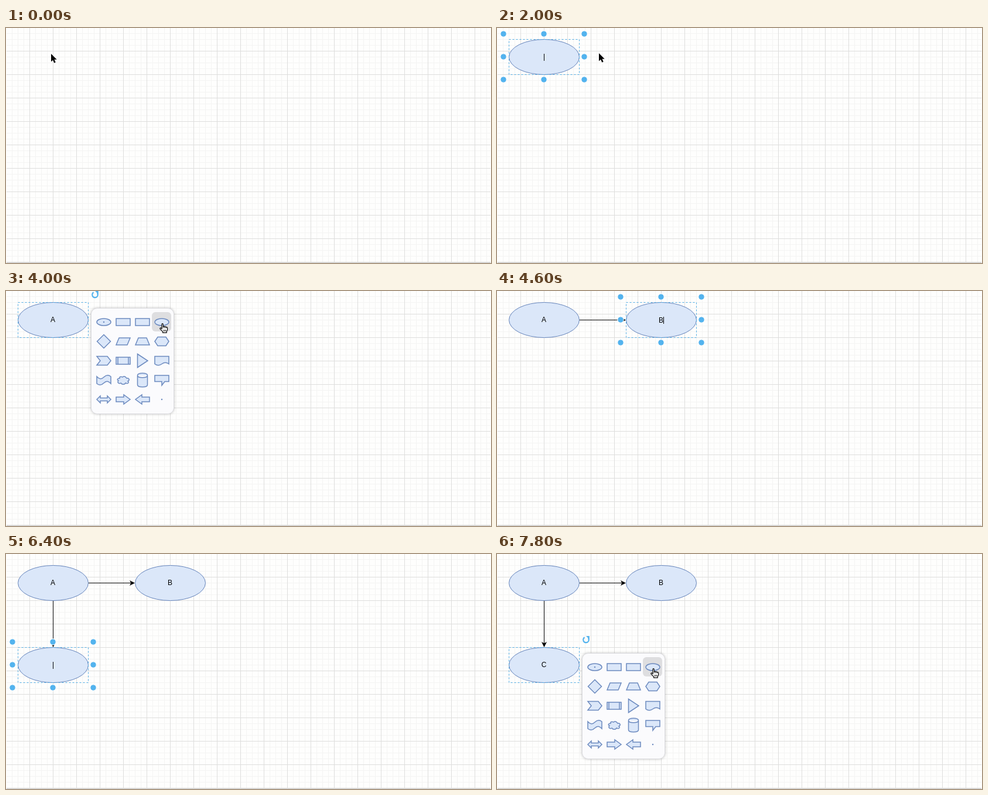
Animation of 828x401 px, one loop 8000 ms. Source, as an HTML page:

```html
<!DOCTYPE html>
<html lang="en">
<head>
<meta charset="utf-8">
<title>Diagram editor</title>
<style>
html, body { margin: 0; width: 100%; height: 100%; overflow: hidden; background: #fefefd; }
svg { display: block; }
text { font: 12px "Liberation Sans", Arial, sans-serif; text-anchor: middle; fill: #000; }
.shape { fill: #dbe7f9; stroke: #6584bb; }
.icon { fill: #dbe7f9; stroke: #6c8abf; stroke-width: 1.5; }
.panel { fill: #fbfbfd; stroke: #dcdce0; filter: drop-shadow(0 0 2px rgba(0,0,0,.25)); }
.frame { fill: none; stroke: #50ace4; stroke-dasharray: 3 3; }
.handle { fill: #53b3ee; stroke: #fff; stroke-width: 1; }
</style>
</head>
<body>
<svg width="828" height="401" viewBox="0 0 828 401">
  <g id="grid" fill="none"></g>
  <g id="scene"></g>
</svg>
<script>
const LOOP = 8000, STEP = 200;
const RX = 60, RY = 30;

// Life of each node: created, typed, committed, hovered, deselected
const nodes = [
  { label: 'A', x: 80.5, y: 49.5, born: 2000, typed: 2400, commit: 2800, hover: 3400, off: 4200 },
  { label: 'B', x: 280.5, y: 49.5, born: 4200, typed: 4400, commit: 4800, hover: LOOP, off: 6200 },
  { label: 'C', x: 80.5, y: 189.5, born: 6200, typed: 6600, commit: 7000, hover: 7200, off: LOOP }
];

const pickers = [
  { from: 1000, to: 2000, x: 56, y: 22 },
  { from: 3600, to: 4200, x: 145, y: 29 },
  { from: 5400, to: 6200, x: 60, y: 84 },
  { from: 7400, to: 8000, x: 145, y: 169 }
];

// from, to, kind, x0, y0, x1, y1
const moves = [
  [0, 1000, 'arrow', 77, 44, 77, 44],
  [1000, 1600, 'hand', 74, 44, 173, 47],
  [1600, 2000, 'hand', 173, 47, 173, 47],
  [2000, 2400, 'arrow', 174, 43, 174, 43],
  [3000, 3400, 'arrow', 174, 43, 175, 46],
  [3400, 3600, 'arrow', 175, 46, 175, 46],
  [3600, 4000, 'hand', 163, 52, 262, 55],
  [4000, 4200, 'hand', 262, 55, 262, 55],
  [4800, 5400, 'arrow', 264, 55, 90, 98],
  [5400, 6000, 'hand', 78, 105, 177, 110],
  [6000, 6200, 'hand', 177, 110, 177, 110],
  [7000, 7400, 'arrow', 181, 108, 162, 188],
  [7400, 7800, 'hand', 163, 192, 262, 195],
  [7800, 8000, 'hand', 262, 195, 262, 195]
];

const oval = 'M-12 0A12 6 0 0 1 12 0A12 6 0 0 1-12 0Z';
const box = 'M-12-6H12V6H-12Z';
const dot = 'M-.5 0A.5.5 0 0 1 .5 0A.5.5 0 0 1-.5 0Z';
const icons = [
  oval + dot, box, box, oval,
  'M0-11.5L11.5 0 0 11.5-11.5 0Z',
  'M-12 6L-7-6H12L7 6Z',
  'M-12 6L-7-6H7L12 6Z',
  'M-12 0L-7-7.5H7L12 0 7 7.5H-7Z',
  'M-12-7.5H6L12 0 6 7.5H-12L-6 0Z',
  box + 'M-9-6V6M9-6V6',
  'M-8.5-11.5L9 0-8.5 11.5Z',
  'M-12-7.5H12V5.5Q6 1 0 5.5T-12 5.5Z',
  'M-12-6Q-6 1 0-5T12-6V6Q6-1 0 5T-12 6Z',
  'M-6-3C-10-3-11 0-8 1C-11 4-7 7-4 5C-2 8 3 8 4 5C8 7 11 4 8 2C12 0 10-4 6-3C4-7 0-7-1-5C-4-7-7-5-6-3Z',
  'M-8.5-8C-8.5-13 8.5-13 8.5-8V8C8.5 13-8.5 13-8.5 8ZM-8.5-8C-8.5-3 8.5-3 8.5-8',
  'M-12-8H12V2.5H5L0 9V2.5H-12Z',
  'M-12 0L-6-6V-2.5H6V-6L12 0 6 6V2.5H-6V6Z',
  'M-12-4H1V-8L12 0 1 8V4H-12Z',
  'M12-4H-1V-8L-12 0-1 8V4H12Z',
  dot
];

const cursors = {
  arrow: '<path d="M0 0V13.6L3.1 10.7 5.3 15.7 7.7 14.6 5.5 9.8H9.7Z" stroke="#fff" stroke-width="1.2" paint-order="stroke"/>',
  hand: '<path d="M4 10V2.2Q4 .7 5.1 .7T6.3 2.2V6Q7.6 4.9 8.8 6.2 10.2 5.3 11.3 6.7 13.4 6.1 13.6 8V11.5L12.2 14V16.2H5.6V14.4L1.8 10.6Q.3 8.6 1.4 8 2.5 7.5 4 9.6Z" fill="#fff" stroke="#000" stroke-width="1.2" stroke-linejoin="round"/>' +
    '<path d="M6.3 6V8.5M8.8 6.4V8.6M11.3 7V8.8M7.2 11V14M9 11V14M10.8 11V14" fill="none" stroke="#000" stroke-width=".8"/>'
};

const path = (d, attrs) => `<path d="${d}" ${attrs}/>`;
const at = (x, y, body) => `<g transform="translate(${x} ${y})">${body}</g>`;
const during = (t, from, to) => t >= from && t < to;

function drawGrid() {
  let minor = '', major = '';
  for (let x = 10; x < 828; x += 10) {
    const d = `M${x + .5} 0V400`;
    x % 40 ? minor += d : major += d;
  }
  for (let y = 10; y <= 400; y += 10) {
    const d = `M1 ${y - .5}H827`;
    y % 40 ? minor += d : major += d;
  }
  document.getElementById('grid').innerHTML = path(minor, 'stroke="#f4f4f3"') +
    path(major, 'stroke="#dededd"') + path('M1 400.5H827', 'stroke="#d4d4d4"');
}

function edge(n) {
  const a = nodes[0], down = n.y > a.y;
  const len = down ? n.y - a.y - 2 * RY : n.x - a.x - 2 * RX;
  const x = down ? a.x : a.x + RX, y = down ? a.y + RY : a.y;
  return `<g transform="translate(${x} ${y}) rotate(${down ? 90 : 0})">` +
    path(`M0 0H${len - 6}`, 'stroke="#000"') +
    path(`M${len - .5} 0l-9-4.5 2.3 4.5-2.3 4.5Z`, '') + '</g>';
}

function shape(n, t) {
  const editing = t < n.commit;
  let s = `<ellipse class="shape" cx="${n.x}" cy="${n.y}" rx="${RX}" ry="${RY}"/>`;
  if (t >= n.typed) s += `<text x="${n.x - .5}" y="${n.y + (editing ? 4 : 3.5)}">${n.label}</text>`;
  if (editing && (t - n.born) % 1000 < 600)
    s += path(`M${n.x + (t >= n.typed ? 4 : 0)} ${n.y - 5.5}v12`, 'stroke="#000"');
  return s;
}

function selection(n, t) {
  const editing = t < n.commit, pad = editing ? 9 : 0;
  let s = `<rect class="frame" x="${n.x - RX}" y="${n.y - RY}" width="${2 * RX}" height="${2 * RY}"/>`;
  if (t < n.hover)
    for (const i of [-1, 0, 1]) for (const j of [-1, 0, 1])
      if (i || j) s += `<circle class="handle" cx="${n.x - .5 + i * (RX + pad)}" cy="${n.y - .5 + j * (RY + pad)}" r="5.2"/>`;
  if (!editing) s += at(n.x + 71.5, n.y - 43,
    path('M-2.5-4.2A4.8 4.8 0 1 0 3.8-3', 'fill="none" stroke="#53b3ee" stroke-width="2.2"') +
    path('M0-6.5H5.8V-.7Z', 'fill="#53b3ee"'));
  return s;
}

function picker(p, t, pointer) {
  let s = '<rect class="panel" x=".5" y=".5" width="141" height="180" rx="10"/>';
  if (t > p.from && pointer) {
    const col = Math.floor((pointer.x + 4 - p.x - 5.5) / 33);
    s += `<rect x="${5 + col * 33}" y="7" width="33" height="33" rx="6" fill="#dedee0"/>`;
  }
  icons.forEach((d, i) => s += at(22 + i % 4 * 33, 24 + Math.floor(i / 4) * 33, path(d, 'class="icon"')));
  return at(p.x, p.y, s);
}

function pointerAt(t) {
  const m = moves.find(m => during(t, m[0], m[1]));
  if (!m) return null;
  const [from, to, kind, x0, y0, x1, y1] = m, k = (t - from) / (to - from);
  return { kind, x: x0 + (x1 - x0) * k, y: y0 + (y1 - y0) * k };
}

function render(t) {
  const live = nodes.filter(n => t >= n.born);
  const pointer = pointerAt(t);
  let s = live.slice(1).map(edge).join('') + live.map(n => shape(n, t)).join('');
  for (const n of live) if (t < n.off) s += selection(n, t);
  for (const p of pickers) if (during(t, p.from, p.to)) s += picker(p, t, pointer);
  if (pointer) s += at(pointer.x, pointer.y, cursors[pointer.kind]);
  document.getElementById('scene').innerHTML = s;
}

let start = null, last = -1;
function tick(now) {
  if (start === null) start = now;
  const t = Math.floor((now - start) % LOOP / STEP) * STEP;
  if (t !== last) render(last = t);
  requestAnimationFrame(tick);
}

drawGrid();
render(0);
requestAnimationFrame(tick);
</script>
</body>
</html>
```
